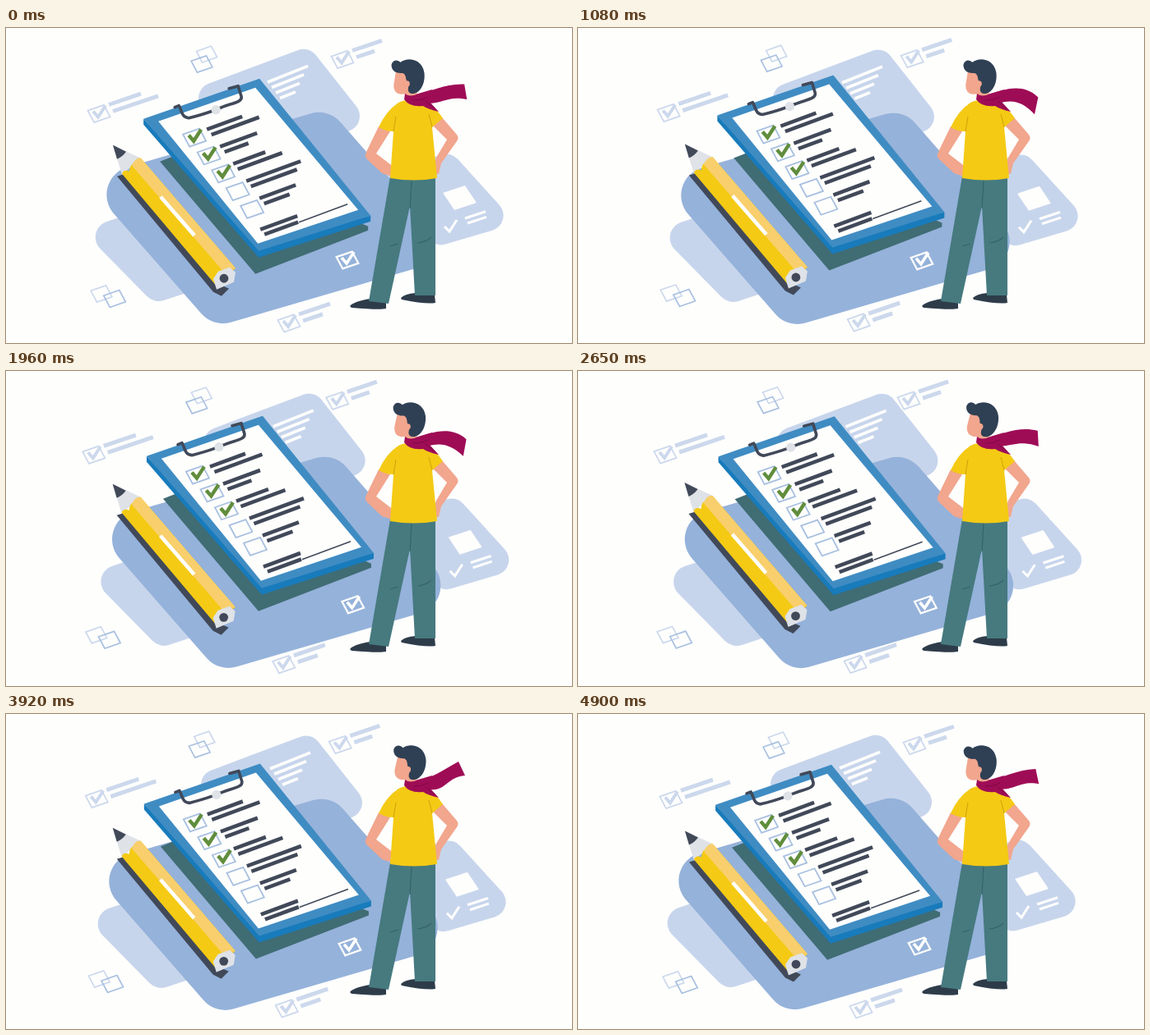
Write an HTML page with a canvas that moves like this. It is 688 px wide and 384 px high and loops after 5000 ms.

```html
<!DOCTYPE html>
<html lang="en">
<head>
<meta charset="utf-8">
<title>Checklist</title>
<style>
html, body { margin: 0; width: 100%; height: 100%; overflow: hidden; background: #fefefd; }
canvas { display: block; width: 688px; height: 384px; }
</style>
</head>
<body>
<canvas id="stage" width="688" height="384"></canvas>
<script>
const ctx = document.getElementById('stage').getContext('2d');
const LOOP = 5000;
const SLOPE = -0.37;
const C = {
  paper: '#fefefd', light: '#c7d5ec', blue: '#95b2da', shade: '#406c74',
  board: '#3f8cc3', edge: '#187bbb', ink: '#414959', pale: '#ccd8ec',
  line: '#a8c0e0', check: '#608d3c', yellow: '#f4ca14', gold: '#f8cf6c',
  wood: '#dfe2e7', skin: '#f1a68d', pants: '#467a7f', fold: '#35646c',
  hair: '#2f4054', shoe: '#2e3c4a', scarf: '#9f0c56'
};

function fill(path, color) {
  ctx.fillStyle = color;
  ctx.fill(new Path2D(path));
}

function stroke(path, color, width) {
  ctx.strokeStyle = color;
  ctx.lineWidth = width;
  ctx.stroke(new Path2D(path));
}

function dot(x, y, radius, color) {
  ctx.beginPath();
  ctx.arc(x, y, radius, 0, Math.PI * 2);
  ctx.fillStyle = color;
  ctx.fill();
}

function moved(dx, dy, draw) {
  ctx.save();
  ctx.translate(dx, dy);
  draw();
  ctx.restore();
}

// Rounded parallelogram from its left corner and two edge vectors
function card(x, y, ux, uy, vx, vy, radius, color) {
  ctx.beginPath();
  ctx.moveTo(x + ux / 2, y + uy / 2);
  ctx.arcTo(x + ux, y + uy, x + ux + vx, y + uy + vy, radius);
  ctx.arcTo(x + ux + vx, y + uy + vy, x + vx, y + vy, radius);
  ctx.arcTo(x + vx, y + vy, x, y, radius);
  ctx.arcTo(x, y, x + ux, y + uy, radius);
  ctx.closePath();
  ctx.fillStyle = color;
  ctx.fill();
}

function box(x, y, color, scale = 1, width = 1.8) {
  moved(x, y, () => {
    ctx.scale(scale, scale);
    stroke('M-14 -4L6 -11L14 4L-6 11Z', color, width);
  });
}

function tick(x, y, color, width = 4) {
  moved(x, y, () => stroke('M-7 -3L-1 4L8 -10', color, width));
}

function bar(x, y, length, color, width, slope = SLOPE) {
  stroke(`M${x} ${y}l${length} ${length * slope}`, color, width);
}

function cards() {
  card(222, 77, 146, -55, 74, 94, 19, C.light);
  card(92, 246, 100, -33, 88, 90, 20, C.light);
  card(444, 180, 97, -29, 79, 87, 19, C.light);
  card(95, 185, 297, -87, 157, 180, 35, C.blue);

  for (let i = 0; i < 4; i++) bar(318 + 5 * i, 66 + 6.5 * i, 49 - 10 * i, C.paper, 3.6, -0.4);

  card(531, 201, 27, -9, 14, 21, 1, C.paper);
  stroke('M533 242L539 248L548 234', C.paper, 3);
  bar(558, 232, 25, C.paper, 3, -0.33);
  bar(561, 238, 23, C.paper, 3, -0.33);

  box(415, 283, C.paper, 0.95, 2.4);
  tick(415, 283, C.paper, 3.6);
}

function note(x, y, first, second) {
  box(x, y, C.pale, 0.97);
  tick(x, y, C.pale);
  bar(x + 12, y - 11, first, C.pale, 5, -0.34);
  bar(x + 17, y - 3, second, C.pale, 5, -0.34);
}

function icons() {
  note(113, 104.5, 39, 55);
  note(409, 38.5, 36, 22);
  note(344, 360, 38, 24);
  box(244, 32, C.pale, 0.9);
  box(238, 44, C.line, 0.92);
  box(116, 324, C.pale, 0.92);
  box(132, 330, C.line, 0.95);
}

function clipboard() {
  fill('M187 163L220 150L440 242V247L303 300Z', C.shade);
  fill('M167 111L308 264L443 229V236L307 280L167 118Z', C.edge);
  fill('M167 111L308 62L443 229L307 272Z', C.board);
  fill('M185 114L303 73L428 222L306 263Z', C.paper);

  for (let i = 0; i < 5; i++) {
    const x = 229 + i * 17.5, y = 134 + i * 21.8;
    box(x, y, C.line);
    if (i < 3) tick(x, y, C.check, 4.4);
  }

  const widths = [43, 58, 45, 29, 39, 54, 66, 56, 44, 31];
  widths.forEach((width, i) => {
    const row = i >> 1, second = i % 2;
    bar(244 + 16 * row + 5.5 * second, 124 + 21 * row + 6.5 * second, width, C.ink, 4.6);
  });
  bar(309, 246, 45, C.ink, 4.6);
  bar(314, 252, 41, C.ink, 4.6);
  bar(356, 237, 59, C.ink, 1.6);

  ctx.lineCap = ctx.lineJoin = 'round';
  stroke('M205 97L210 95C214 102 213 109 222 110C234 107 238 106 249 102L262 97C274 92 287 91 286 84L282 71L271 74', C.ink, 3.6);
  ctx.lineCap = 'butt';
  ctx.lineJoin = 'miter';
  dot(255, 100, 5.6, C.wood);
}

function pencil() {
  fill('M135 181L145 178L258 312L271 318L262 327L252 322Z', C.ink);
  fill('M130 143L164 159L141 179Z', C.wood);
  fill('M130 143L146 151Q142 157 135 160Z', C.ink);
  fill('M141 178Q143 172 150 175Q151 165 156 166Q158 158 164 159L279 293L256 315Z', C.yellow);
  fill('M153 168Q157 158 164 159L279 293L265 298Z', C.gold);
  bar(188, 206, 41, C.paper, 4.6, 1.15);
  fill('M252 306L258 297L272 292L279 298L277 310L256 319Z', C.wood);
  dot(265, 305.5, 5.4, C.ink);
}

function body() {
  fill('M418 339Q423 333 443 330L462 334V342Q455 344 420 341Z', C.shoe);
  fill('M480 329Q485 324 498 323L521 325L522 335Q510 337 481 331Z', C.shoe);
  fill('M453 120L467 126L450 153L472 170L469 181L457 177L439 160Q435 156 438 151Z', C.skin);
  fill('M530 109L548 130Q551 134 548 138L529 165L526 178L517 177L523 158L536 136L518 118Z', C.skin);
  fill('M467 181L522 183L522 326L497 326L491 217L465 336L441 333Z', C.pants);
  stroke('M493 186L491 220M467 266L477 263M500 262Q511 261 517 255', C.fold, 1.2);
  fill('M477 91Q490 84 512 91Q520 94 531 110L518 121L524 183Q496 188 467 183L471 126Q461 126 453 121Q462 101 477 91Z', C.yellow);
  stroke('M471 126L474 108M518 121L514 105', '#cda20c', 1);
}

function head(tilt) {
  fill('M485 74L499 74L501 90L486 90Z', C.skin);
  moved(492, 88, () => {
    ctx.rotate(tilt);
    ctx.translate(-492, -88);
    fill('M474 50L471 70Q471 80 480 81L492 80L494 50Z', C.skin);
    fill('M468 45C470 38 476 39 479 42C487 35 505 37 508 54C510 68 503 79 495 80C489 80 487 77 490 68C484 66 488 58 482 55C473 56 468 52 468 45Z', C.hair);
    dot(487, 68, 3.6, C.skin);
  });
}

// swing: -1 is raised, 1 is drooping
function scarf(swing) {
  const k = (swing + 1) / 2;
  const bulge = 4 * (1 - swing * swing);
  const mix = (x1, y1, x2, y2, push = 0) =>
    `${x1 + (x2 - x1) * k + push} ${y1 + (y2 - y1) * k} `;
  fill('M485 80Q491 85 501 80L518 75L514 89L526 102Q513 99 507 95Q491 97 484 87Z', C.scarf);
  fill('M500 81C' + mix(519, 78, 514, 76) + mix(530, 69, 541, 65) +
    mix(550, 58, 559, 86, bulge) +
    'L' + mix(558, 75, 554, 107, bulge) +
    'C' + mix(535, 77, 541, 91) + mix(536, 95, 528, 86) + '512 92Z', C.scarf);
  stroke('M495 88Q505 89 513 84M510 89L521 98', '#7d0944', 1);
}

function draw(time) {
  const angle = 2 * Math.PI * (time % LOOP) / LOOP;
  // 0 to 1 and back; a positive lag arrives later
  const drift = lag => (1 - Math.cos(angle - lag)) / 2;
  const base = drift(0), lead = drift(-0.4), late = drift(0.4);

  ctx.fillStyle = C.paper;
  ctx.fillRect(0, 0, 688, 384);
  moved(7.5 * base, 2 * base, cards);
  moved(-7 * base, -2.5 * base, icons);
  moved(4 * lead, -7.5 * lead, clipboard);
  moved(-0.5 * late, -7 * late, pencil);
  body();
  head(0.1 * drift(0.7));
  scarf(Math.sin(angle - 0.25));
}

function play() {
  draw(performance.now());
  requestAnimationFrame(play);
}
play();
</script>
</body>
</html>
```
